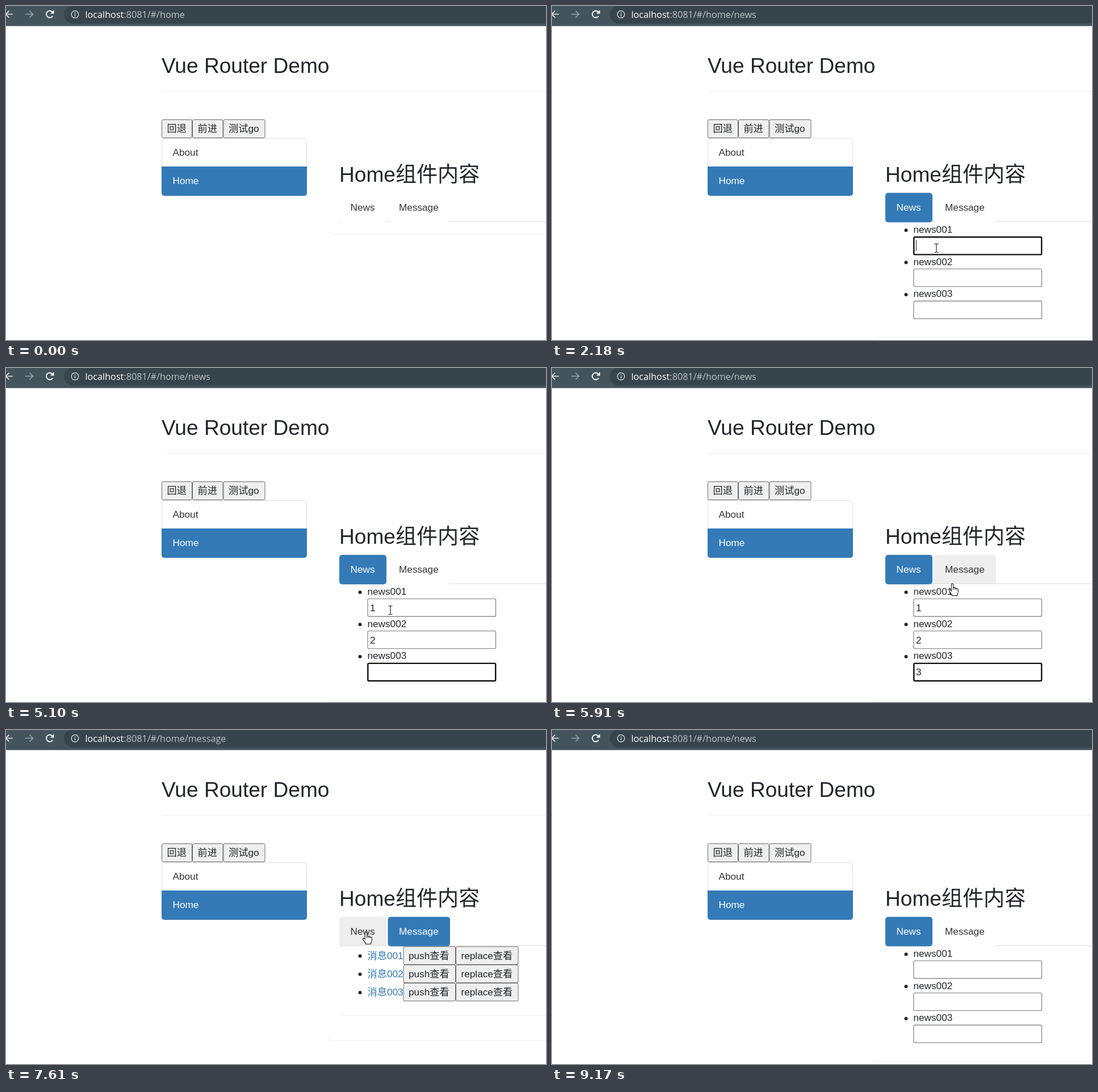
An HTML page with a canvas for the animation above (9770 ms loop, 951x589 px).

```html
<!DOCTYPE html>
<html lang="zh-CN">
<head>
<meta charset="utf-8">
<title>Vue Router Demo</title>
<style>
html, body { margin: 0; width: 100%; height: 100%; overflow: hidden; background: #fff; }
canvas { display: block; }
</style>
</head>
<body>
<canvas id="stage" width="951" height="589"></canvas>
<script>
const ctx = document.getElementById('stage').getContext('2d');
const W = 951, H = 589, LOOP = 9770, STEP = 70;
const SANS = '"Liberation Sans", "Noto Sans CJK SC", "Noto Sans CJK", sans-serif';
const BODY = '17.2px ' + SANS, HEAD = '37.1px ' + SANS;
const URL_FONT = '16.2px "Open Sans", "Noto Sans", sans-serif';
const INK = '#212529', SOFT = '#333', BLUE = '#337ab7', LINE = '#ddd';

// Timeline in ms
const PAGES = [[0, 'home'], [1090, 'news'], [7060, 'message'], [8210, 'news']];
const CLICKS = [[960, 1090], [2110, 2180], [6930, 7060], [8140, 8210]];
const FOCUS = [[2110, 3440], [3440, 4570], [4570, 6930]];
const TYPED = [2710, 4030, 5230];
const CARET_OFF = [[2640, 2710], [3180, 3440], [3900, 4030], [5100, 5230], [5760, 6290], [6860, 6930]];

const easeOut = p => 1 - (1 - p) ** 2;
const easeIn = p => p ** 1.6;
const smooth = p => p * p * (3 - 2 * p);
const MOVES = [
  { t: [70, 760], from: [878, 573], to: [626, 356], ease: easeOut },
  { t: [1360, 1650], from: [626, 356], to: [677, 427], ease: smooth },
  { t: [5560, 5910], from: [677, 427], to: [705, 380], ease: smooth },
  { t: [5910, 6320], from: [705, 380], to: [710, 366], ease: easeOut },
  { t: [7130, 7610], from: [710, 366], to: [634, 356], ease: smooth },
  { t: [8540, 9170], from: [634, 356], to: [906, 580], ease: easeIn }
];

const TABS = [
  { name: 'News', page: 'news', x: 587, w: 83, gap: [590, 667] },
  { name: 'Message', page: 'message', x: 672.5, w: 109.5, gap: [676, 779] }
];
const INPUT = { x: 636.5, w: 226.5, h: 31.5 };
const inputY = i => 406.7 + i * 56.7;

const HAND = new Path2D('M-1.7 2Q-1.7 .3 0 .3Q1.7 .3 1.7 2V7.6Q3.2 6.4 4.6 8Q6.2 7.2 7.3 9Q10.3 8.4 10.3 11.5' +
  'V15Q10 17.4 8.6 19V21.5H-.6V20Q-2.2 18.4-5.2 13.6Q-6 11.6-4.6 11Q-3.2 10.6-1.7 13Z');
const KNUCKLES = new Path2D('M1.7 7.6V11M4.6 8V11M7.3 9V11.5');
const ARROW = new Path2D('M.5 .5V17L4.3 13.4L6.8 19.2L9.4 18.1L6.9 12.4H12.2Z');
const BEAM = new Path2D('M-3.5 -7.5H-1.2L0 -6.8L1.2 -7.5H3.5M0 -6.8V6.8M-3.5 7.5H-1.2L0 6.8L1.2 7.5H3.5');

const within = (t, [a, b]) => t >= a && t < b;
const inside = (p, x, y, w, h) => p && p[0] >= x && p[0] <= x + w && p[1] >= y && p[1] <= y + h;

function text(str, x, y, color = INK, font = BODY) {
  ctx.font = font;
  ctx.fillStyle = color;
  ctx.fillText(str, x, y);
}

function rect(x, y, w, h, color) {
  ctx.fillStyle = color;
  ctx.fillRect(x, y, w, h);
}

function box(x, y, w, h, r, fill, stroke, width = 1) {
  ctx.beginPath();
  ctx.roundRect(x, y, w, h, r);
  if (fill) { ctx.fillStyle = fill; ctx.fill(); }
  if (stroke) { ctx.strokeStyle = stroke; ctx.lineWidth = width; ctx.stroke(); }
}

function dot(x, y, r, color) {
  ctx.beginPath();
  ctx.arc(x, y, r, 0, 7);
  ctx.fillStyle = color;
  ctx.fill();
}

function outline(path, color, width) {
  ctx.strokeStyle = color;
  ctx.lineWidth = width;
  ctx.stroke(path);
}

function button(label, x, y, w, h) {
  box(x + .5, y + .5, w - 1, h - 1, 2, '#efefef', '#6a6a6a');
  text(label, x + 9.5, y + 22);
}

function pointerAt(t) {
  if (t < MOVES[0].t[0] || t >= MOVES[MOVES.length - 1].t[1]) return null;
  const m = MOVES.filter(m => t >= m.t[0]).pop();
  const [a, b] = m.t;
  const p = t >= b ? 1 : Math.floor((t - a) / STEP) * STEP / (b - a);
  const k = m.ease(p);
  return m.from.map((v, i) => v + (m.to[i] - v) * k);
}

function drawToolbar(page) {
  rect(0, 0, W, 35.4, '#44545c');
  box(102, -1, 900, 32, 16, '#37444b');
  outline(new Path2D('M12 14.5H0M5.5 8.5L-.5 14.5L5.5 20.5'), '#e8ebec', 1.7);
  outline(new Path2D('M34 14.5H47M41.5 8.5L47.5 14.5L41.5 20.5'), '#98a3a8', 1.6);
  ctx.beginPath();
  ctx.arc(77, 14.5, 6, .55, 5.5);
  ctx.strokeStyle = '#fff';
  ctx.lineWidth = 1.9;
  ctx.stroke();
  ctx.fillStyle = '#fff';
  ctx.fill(new Path2D('M84.5 7V13.5H78Z'));
  ctx.beginPath();
  ctx.arc(121.5, 14.7, 6.3, 0, 7);
  ctx.strokeStyle = '#d5dadc';
  ctx.lineWidth = 1.4;
  ctx.stroke();
  rect(120.8, 13.5, 1.5, 4.8, '#d5dadc');
  rect(120.8, 11, 1.5, 1.6, '#d5dadc');
  text('localhost', 139.5, 20.5, '#fff', URL_FONT);
  const x = 139.5 + ctx.measureText('localhost').width;
  text(':8081/#/home' + (page === 'home' ? '' : '/' + page), x, 20.5, '#bcc4c8', URL_FONT);
}

function drawFrame(page) {
  text('Vue Router Demo', 274, 118, INK, HEAD);
  rect(274, 150, W, 1, '#eee');
  button('回退', 274, 200, 54, 33);
  button('前进', 328, 200, 54.5, 33);
  button('测试go', 382.5, 200, 74, 33);
  box(274.5, 233.5, 255, 101, 5, '#fff', LINE);
  box(274, 283, 256, 51.7, [0, 0, 5, 5], BLUE);
  text('About', 293.5, 264, SOFT);
  text('Home', 293.5, 314, '#fff');

  const bottom = { home: 402, news: 585, message: 548 }[page];
  rect(568, 240, 1, bottom - 245, '#fcfcfc');
  ctx.beginPath();
  ctx.moveTo(568.5, bottom - 5);
  ctx.quadraticCurveTo(568.5, bottom - .5, 573, bottom - .5);
  ctx.lineTo(W, bottom - .5);
  ctx.strokeStyle = '#f0f0f0';
  ctx.lineWidth = 1;
  ctx.stroke();
  text('Home组件内容', 587, 309.5, INK, HEAD);
}

function drawTabs(page, pointer) {
  rect(588, 380, W, 1, LINE);
  for (const tab of TABS) {
    const active = tab.page === page;
    if (active) box(tab.x, 329.5, tab.w, 52, 5, BLUE);
    else if (inside(pointer, tab.x, 330, tab.w, 51)) {
      box(tab.x, 329.5, tab.w, 50.5, [5, 5, 0, 0], '#eee');
    } else rect(tab.gap[0], 379, tab.gap[1] - tab.gap[0], 3, '#fff');
    text(tab.name, tab.x + 19.5, 361, active ? '#fff' : SOFT);
  }
}

function drawNews(t) {
  for (let i = 0; i < 3; i++) {
    const y = inputY(i), focused = within(t, FOCUS[i]);
    const typed = within(t, [TYPED[i], PAGES[2][0]]);
    dot(623.5, y - 11.2, 3, INK);
    text('news00' + (i + 1), 636.5, y - 6.7);
    if (focused) box(INPUT.x + .8, y + .8, INPUT.w - 1.6, INPUT.h - .6, 2, '#fff', '#101010', 2.4);
    else box(INPUT.x + .5, y + .3, INPUT.w - 1, INPUT.h - .4, 2, '#fff', '#767676', 1.1);
    if (typed) text(i + 1, 641, y + 22.2);
    if (focused && !CARET_OFF.some(s => within(t, s))) {
      rect(typed ? 650 : 641, Math.round(y + 6.5), 1, 19, '#222');
    }
  }
}

function drawMessages() {
  for (let i = 0; i < 3; i++) {
    const y = 381.5 + i * 32.2;
    dot(623.5, y + 17, 3, INK);
    text('消息00' + (i + 1), 636.5, y + 22, BLUE);
    button('push查看', 699.5, y, 92.5, 32.5);
    button('replace查看', 792, y, 110.5, 32.5);
  }
  rect(587, 503, W, 1, '#eee');
}

function drawPointer(p, t, page) {
  if (!p) return;
  if (CLICKS.some(c => within(t, c))) {
    ctx.globalCompositeOperation = 'multiply';
    dot(p[0] - .5, p[1] + 1.5, 13, '#fbf451');
    ctx.globalCompositeOperation = 'source-over';
  }
  const onTab = TABS.some(tab => inside(p, tab.x, 330, tab.w, 51.5));
  const onText = page === 'news' && [0, 1, 2].some(i =>
    inside(p, INPUT.x, inputY(i), INPUT.w, INPUT.h) || inside(p, INPUT.x, inputY(i) - 22, 69, 20));
  ctx.save();
  ctx.translate(p[0], p[1]);
  if (onText) outline(BEAM, '#111', 1.1);
  else {
    const shape = onTab ? HAND : ARROW;
    ctx.fillStyle = '#fff';
    ctx.fill(shape);
    outline(shape, '#111', 1.1);
    if (onTab) outline(KNUCKLES, '#111', 1);
  }
  ctx.restore();
}

function render(t) {
  const page = PAGES.filter(p => t >= p[0]).pop()[1];
  const pointer = pointerAt(t);
  rect(0, 0, W, H, '#fff');
  drawToolbar(page);
  drawFrame(page);
  drawTabs(page, pointer);
  if (page === 'news') drawNews(t);
  if (page === 'message') drawMessages();
  drawPointer(pointer, t, page);
}

const start = performance.now();
function tick() {
  render((performance.now() - start) % LOOP);
  requestAnimationFrame(tick);
}
tick();
</script>
</body>
</html>
```
